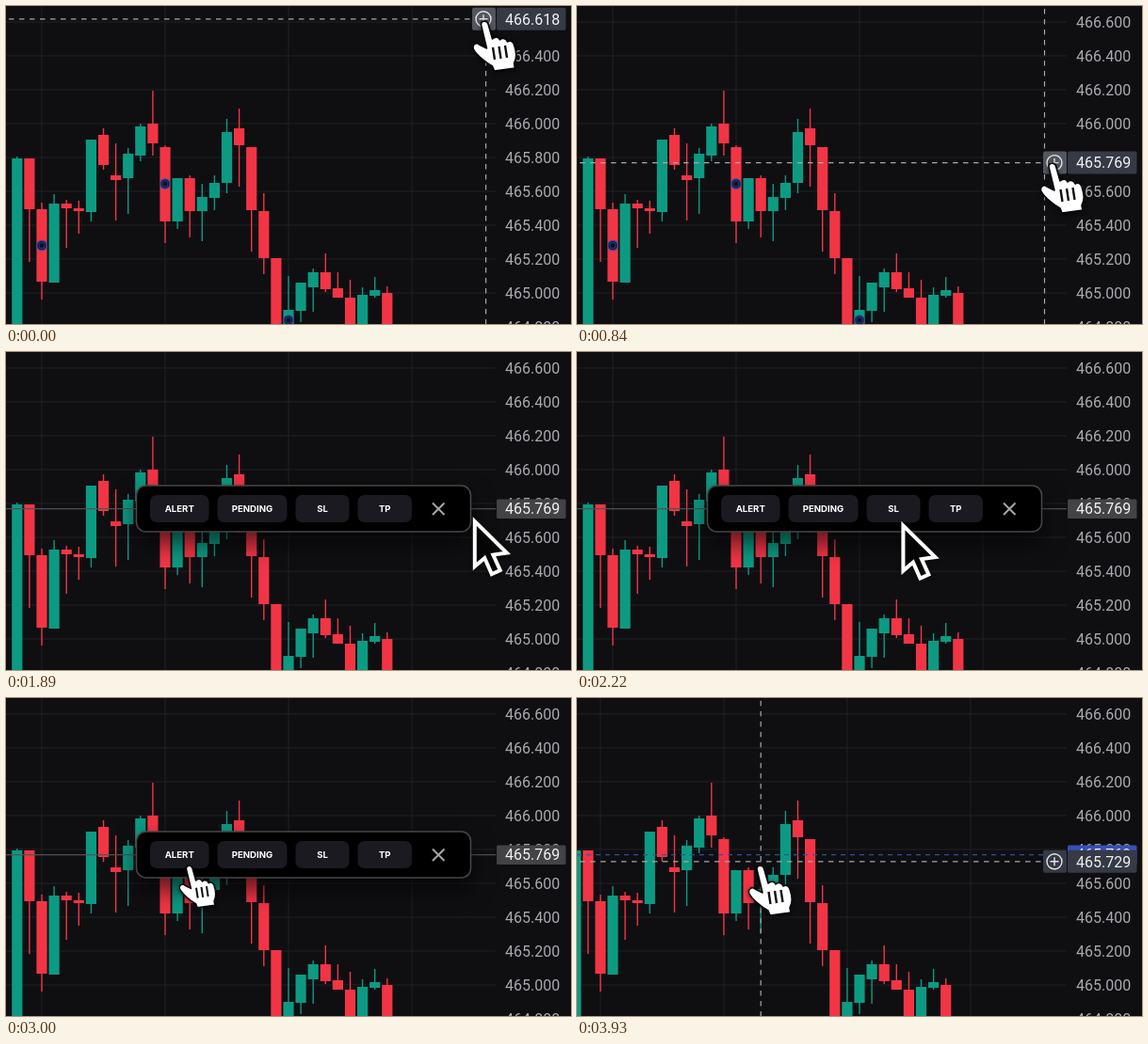
Animation of 600x338 px, one loop 3.96 s. Source, as an HTML page:

```html
<!DOCTYPE html>
<html lang="en">
<head>
<meta charset="utf-8">
<title>Chart price menu</title>
<style>
  html, body { margin: 0; width: 100%; height: 100%; overflow: hidden; background: #0f0f12; }
  svg { display: block; width: 600px; height: 338px; }
  .axis text { font: 16px Roboto, Inter, sans-serif; fill: #a9aab0; }
  .axis .tag { fill: #f1f1f3; }
  .menu text { font: 700 9.6px Inter, sans-serif; fill: #fff; text-anchor: middle; }
  .cursor { filter: drop-shadow(0 1px 2px rgba(0, 0, 0, .6)); }
</style>
</head>
<body>
<svg id="stage" viewBox="0 0 600 338">
  <rect width="600" height="338" fill="#0f0f12"/>
  <g id="rows" stroke="#202126"></g>
  <g id="chart">
    <g id="columns" stroke="#202126"></g>
    <g id="candles"></g>
    <g id="marks" fill="#10101a" stroke="#2d4dae" stroke-width="1.3"></g>
  </g>
  <path id="alertLine" d="M0 166.6H520" stroke="#344d9f" stroke-width="1.3" stroke-dasharray="5 5"/>
  <path id="menuLine" d="M0 166.6H520" stroke="#505054" stroke-width="1.3"/>
  <g id="cross" stroke="#a8a8ab" stroke-width="1.2" stroke-dasharray="5.5 5.5">
    <path id="crossX" d="M0 3V338"/>
    <path id="crossY" d="M3 0H495"/>
  </g>
  <g class="axis">
    <g id="prices"></g>
    <g id="fixedTag">
      <rect id="fixedBox" x="521" y="156.5" width="73.5" height="20.5" rx="1.5"/>
      <text class="tag" x="530" y="172.3">465.769</text>
    </g>
    <g id="liveTag">
      <rect x="521" y="-12" width="73.5" height="24" rx="2" fill="#363a45"/>
      <rect id="plusBox" x="495" y="-12" width="25" height="24" rx="2"/>
      <circle cx="507" r="8" fill="none" stroke="#e4e4e7" stroke-width="1.4"/>
      <path d="M502.5 0h9M507 -4.5v9" stroke="#e4e4e7" stroke-width="1.4"/>
      <text id="livePrice" class="tag" x="530" y="5.7"></text>
    </g>
  </g>
  <g id="menu" class="menu">
    <rect x="138.5" y="142" width="355" height="49" rx="10" fill="#000" stroke="#47474a" stroke-width="1.5"
          style="filter: drop-shadow(0 12px 12px rgba(0, 0, 0, .6))"/>
    <g id="buttons"></g>
    <path d="M453 160.5l12.5 12.5m0 -12.5l-12.5 12.5" stroke="#a6a6aa" stroke-width="2"/>
  </g>
  <g id="plus" class="cursor">
    <path d="M-5 -24H5V-5H24V5H5V24H-5V5H-24V-5H-5Z" fill="#080809" stroke="#fff" stroke-width="3.4"/>
  </g>
  <g id="arrow" class="cursor">
    <path d="M1 3V51L11.5 42 19 59 28 55 20.5 38.5 35 36.5Z" fill="#050506" stroke="#fff" stroke-width="4"/>
  </g>
  <g id="hand" class="cursor">
    <path d="M-3 3C-3 -2 3 -2 4.500 2L9 18C12 15 16 16 17 19C20 16 24 18 25 21C28 19 31 21 32 24C35 33 35 38 32 44L33 49L11 52L9 47C3 44 -8 35 -11 29C-13 24 -8 21 -5 24L3 28Z"
          fill="#fff" stroke="#08080a" stroke-width="1.6" stroke-linejoin="round"/>
    <path d="M9.500 27l2 13M16 26l2 13M22.500 25l2 13" stroke="#111" stroke-width="2.4"/>
  </g>
</svg>
<script>
const LOOP = 3960, TICK = 30, STEP = 13.1;
const MENU_OPEN = 1140, MENU_CLOSE = 3150, NEW_BAR = 3510;
const $ = id => document.getElementById(id);

function add(parent, tag, attrs, text = '') {
  const node = document.createElementNS('http://www.w3.org/2000/svg', tag);
  for (const key in attrs) node.setAttribute(key, attrs[key]);
  node.textContent = text;
  $(parent).append(node);
}
const place = (id, x, y, scale = 1) =>
  $(id).setAttribute('transform', `translate(${x} ${y}) scale(${scale})`);
const show = (id, visible) => { $(id).style.display = visible ? '' : 'none'; };

// Each bar in stage pixels: open, close, high, low
const bars = [
  [345, 162, 160, 345], [162, 216, 162, 272], [216, 293, 209, 312], [294, 210, 200, 294],
  [210, 215, 206, 257], [215, 218, 207, 242], [219, 142, 142, 229], [137, 169, 130, 174],
  [180, 185, 146, 228], [183, 157, 151, 221], [159, 128, 125, 165], [125, 146, 90, 159],
  [150, 229, 148, 252], [229, 183, 183, 237], [183, 218, 180, 246], [218, 203, 189, 250],
  [204, 188, 180, 217], [188, 134, 120, 199], [130, 148, 109, 192], [150, 217, 150, 261],
  [218, 268, 199, 285], [268, 345, 268, 345], [345, 323, 287, 345], [324, 294, 294, 336],
  [299, 283, 279, 325], [283, 301, 263, 304], [300, 310, 283, 310], [310, 345, 291, 345],
  [345, 307, 299, 345], [308, 302, 288, 310], [305, 345, 298, 345]
];
const barX = i => 11.8 + STEP * i;

bars.forEach(([open, close, high, low], i) => {
  const fill = open > close ? '#0d9a82' : '#f23545', x = barX(i);
  add('candles', 'rect', { x: x - 0.7, y: high, width: 1.4, height: low - high, fill });
  add('candles', 'rect', { x: x - 5.6, y: Math.min(open, close), width: 11.2, height: Math.abs(open - close), fill });
});
for (let i = 0; i < 10; i++) {
  const y = 17 + 36 * i;
  add('rows', 'path', { d: `M0 ${y}H520` });
  add('prices', 'text', { x: 530, y: y + 5.7 }, (466.6 - 0.2 * i).toFixed(3));
}
for (let i = 2; i < 40; i += 10) add('columns', 'path', { d: `M${barX(i)} 0V338` });
for (const [i, y] of [[2, 254.5], [12, 189], [22, 334]]) {
  add('marks', 'circle', { cx: barX(i), cy: y, r: 5.2 });
  add('marks', 'circle', { cx: barX(i), cy: y, r: 3.2, 'stroke-width': 0.8 });
}
for (const [label, x, width] of [['ALERT', 153, 62.5], ['PENDING', 224.5, 74], ['SL', 307.5, 57], ['TP', 373.5, 57.5]]) {
  add('buttons', 'rect', { x, y: 152, width, height: 29, rx: 7, fill: '#1b1a21' });
  add('buttons', 'text', { x: x + width / 2, y: 170 }, label);
}

const clamp = v => Math.min(1, Math.max(0, v));
const ease = v => (v = clamp(v), v * v * (3 - 2 * v));

// Time, x, y of the pointer's stops
const stops = [[65, 507.5, 17], [795, 504, 168], [1600, 504, 168], [1880, 497, 177], [2550, 200.5, 186], [2900, 194, 179]];
function pointerAt(t) {
  let [, x, y] = stops[0];
  for (let i = 1; i < stops.length; i++) {
    const [from, x0, y0] = stops[i - 1], [to, x1, y1] = stops[i];
    const k = ease((t - from) / (to - from));
    x += (x1 - x0) * k;
    y += (y1 - y0) * k;
  }
  return [x, y];
}
const press = (t, at) => 0.16 * ease(1 - Math.abs(t - at) / 150);

function draw(t) {
  const open = t >= MENU_OPEN && t < MENU_CLOSE, after = t >= MENU_CLOSE;
  const [x, y] = pointerAt(t);

  place('chart', t >= NEW_BAR ? -STEP : 0, 0);
  show('marks', t < MENU_OPEN);
  for (const id of ['menu', 'menuLine']) show(id, open);
  show('alertLine', after);
  show('fixedTag', open || after);
  $('fixedBox').setAttribute('fill', after ? '#3950b5' : '#434346');

  const lineY = after ? 173.8 : 13.8 + 152.8 * ease(t / 730);
  const lineX = after ? barX(14) : barX(t < 260 ? 38 : 37);
  for (const id of ['cross', 'liveTag']) show(id, !open);
  place('crossX', lineX, 0);
  place('crossY', 0, lineY);
  place('liveTag', 0, lineY);
  $('crossY').setAttribute('d', after ? 'M3 0H495' : 'M3 0H493');
  $('plusBox').setAttribute('fill', after ? '#363a45' : '#54565e');
  $('livePrice').textContent = (466.6 - (lineY - 17) / 180).toFixed(3);

  const shape = t < MENU_OPEN || x < 216 ? 'hand' : t < 1700 ? 'plus' : 'arrow';
  for (const id of ['hand', 'plus', 'arrow']) show(id, id === shape);
  place(shape, x, y, 1 - press(t, 1060) - press(t, 3010));
}

const start = performance.now();
function frame() {
  const t = (performance.now() - start) % LOOP;
  draw(Math.floor(t / TICK) * TICK);
  requestAnimationFrame(frame);
}
draw(0);
requestAnimationFrame(frame);
</script>
</body>
</html>
```
